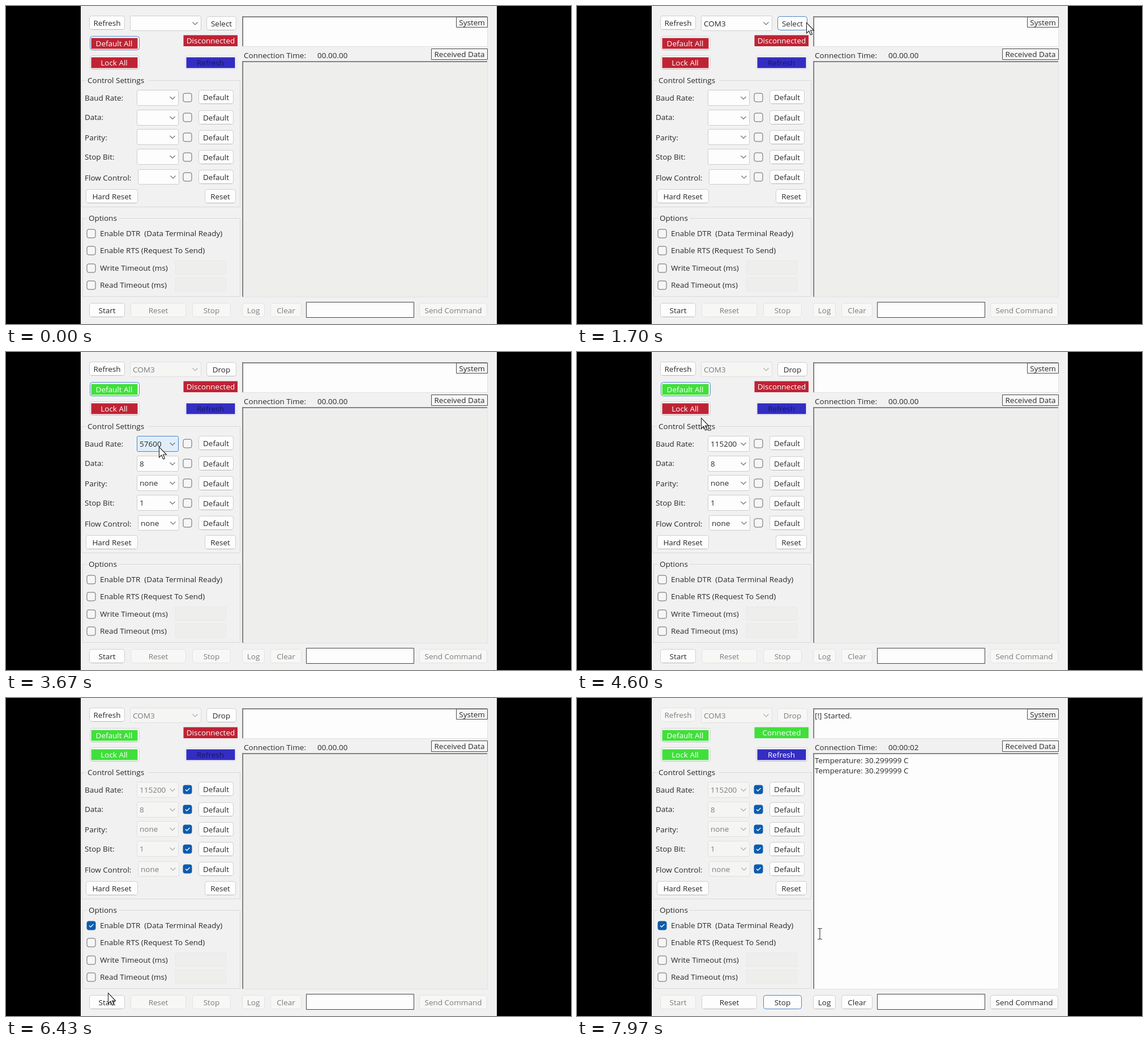
Write an HTML page with a canvas that moves like this. It is 998 px wide and 561 px high and loops after 8 s.

```html
<!DOCTYPE html>
<html lang="en">
<head>
<meta charset="utf-8">
<title>Serial monitor</title>
<style>
html, body { margin: 0; width: 100%; height: 100%; overflow: hidden; background: #000; }
canvas { display: block; }
</style>
</head>
<body>
<canvas id="stage" width="998" height="561"></canvas>
<script>
const ctx = document.getElementById('stage').getContext('2d');
const LOOP = 8000;
const FONT = '13.5px "Open Sans", "Noto Sans", sans-serif';
const INK = '#292929', GREY = '#7c7c7c', FACE = '#f1f1f1';
const RED = '#be2334', GREEN = '#40df3b', BLUE = '#332dc2', ACCENT = '#4a86c8';

// Moments when the interface changes
const AT = {
  port: 950, select: 1650, drop: 1790, defaults: 2560, lock: 4840,
  dtr: 5640, start: 6640, first: 7000, second: 7840
};
const BAUDS = ['9600', '14400', '19200', '38400', '57600', '115200'];
const BAUD_STEPS = [3290, 3380, 3470, 3580, 3900];

// Pointer path: time, x, y
const PATH = [
  [150, 470, 130], [620, 300, 32], [1080, 300, 32], [1600, 405, 29],
  [1850, 405, 29], [2400, 226, 56], [2680, 226, 56], [3220, 270, 167],
  [4020, 270, 167], [4600, 219, 116], [4760, 205, 102], [4960, 205, 102],
  [5520, 150, 401], [5770, 150, 401], [6430, 180, 520], [6540, 183, 533],
  [6860, 183, 533], [7600, 429, 416], [8000, 429, 416]
];

let now = 0, pointer = null, focus = '';

const ease = k => k * k * (3 - 2 * k);

function pointerAt(t) {
  if (t < PATH[0][0]) return null;
  const i = Math.max(1, PATH.findIndex(p => p[0] > t));
  const [t0, x0, y0] = PATH[i - 1], [t1, x1, y1] = PATH[i];
  const k = ease((t - t0) / (t1 - t0));
  return { x: x0 + (x1 - x0) * k, y: y0 + (y1 - y0) * k };
}

function focusAt(t) {
  if (t < AT.port) return 'defaultAll';
  if (t < AT.select) return '';
  if (t < AT.defaults) return 'select';
  if (t < AT.lock) return 'defaultAll';
  if (t < AT.dtr) return 'lockAll';
  return t < AT.start ? 'dtr' : 'stop';
}

const hovered = (x, y, w, h) => pointer &&
  pointer.x >= x && pointer.x <= x + w && pointer.y >= y && pointer.y <= y + h;

function rect(x, y, w, h, fill) {
  ctx.fillStyle = fill;
  ctx.fillRect(x, y, w, h);
}

function frame(x, y, w, h, stroke, fill, r = 0) {
  ctx.beginPath();
  ctx.roundRect(x + .5, y + .5, w - 1, h - 1, r);
  if (fill) { ctx.fillStyle = fill; ctx.fill(); }
  ctx.strokeStyle = stroke;
  ctx.lineWidth = 1;
  ctx.stroke();
}

function text(s, x, cy, color = INK, align = 'left') {
  ctx.fillStyle = color;
  ctx.textAlign = align;
  ctx.fillText(s, x, Math.round(cy + 5));
}

function buttonFace(x, y, w, h, on, id) {
  const lit = on && (hovered(x, y, w, h) || (id && id === focus));
  frame(x, y, w, h, lit ? ACCENT : on ? '#cfcfcf' : '#e3e3e3', on ? '#fdfdfd' : '#f7f7f6', 4);
  if (on && !lit) rect(x + 4, y + h - 1, w - 8, 1, '#b8b8b8');
}

function button(s, x, y, w, h, on = true, id = '') {
  buttonFace(x, y, w, h, on, id);
  text(s, x + w / 2, y + h / 2, on ? INK : GREY, 'center');
}

function colorButton(s, x, y, w, h, color, ink, on, id) {
  buttonFace(x, y, w, h, on, id);
  rect(x + 2.5, y + 3.5, w - 6, h - 6, color);
  text(s, x + w / 2 - 1, y + h / 2, ink, 'center');
}

function combo(s, x, y, w, h, on) {
  const lit = on && hovered(x, y, w, h);
  frame(x, y, w, h, lit ? ACCENT : on ? '#cdcdcd' : '#e0e0e0',
    lit ? '#e0eefa' : on ? '#fdfdfd' : '#f5f5f4', 2);
  text(s, x + 5, y + h / 2, on ? INK : GREY);
  const ax = x + w - 11, ay = y + h / 2;
  ctx.beginPath();
  ctx.moveTo(ax - 4.5, ay - 2);
  ctx.lineTo(ax, ay + 2.5);
  ctx.lineTo(ax + 4.5, ay - 2);
  ctx.strokeStyle = on ? '#6c6c6c' : '#aaa';
  ctx.lineWidth = 1.1;
  ctx.stroke();
}

function checkbox(x, cy, checked) {
  const y = cy - 7;
  frame(x - .5, y - .5, 16, 16, checked ? '#0c5cae' : '#666', checked ? '#0c5cae' : '#f6f6f6', 3);
  if (!checked) return;
  ctx.beginPath();
  ctx.moveTo(x + 4, y + 7.5);
  ctx.lineTo(x + 6.5, y + 10);
  ctx.lineTo(x + 11.5, y + 5);
  ctx.strokeStyle = '#fff';
  ctx.lineWidth = 1.3;
  ctx.stroke();
}

function group(title, x, y, w, h, gap) {
  frame(x, y, w, h, '#d9d9d9');
  rect(x + 8, y - 1, gap, 3, FACE);
  text(title, x + 11, y);
}

function sunken(x, y, w, h, fill) {
  rect(x, y, w, h, fill);
  rect(x, y, w, 1, '#9c9c9c');
  rect(x, y + 1, w, 1, '#6b6b6b');
  rect(x, y, 1, h, '#9c9c9c');
  rect(x + 1, y, 1, h, '#6b6b6b');
  rect(x + w - 1, y, 1, h, '#e2e2e2');
  rect(x, y + h - 1, w, 1, '#e2e2e2');
}

function tag(s, x, y, w, h) {
  frame(x, y, w, h, '#4c4c4c', '#f6f6f6');
  text(s, x + w / 2, y + h / 2, INK, 'center');
}

function drawTop(running) {
  const picked = now >= AT.drop;
  button('Refresh', 147, 17, 63, 25, !running);
  combo(now >= AT.port ? 'COM3' : '', 219, 17, 126, 27, !picked);
  button(picked ? 'Drop' : 'Select', 354, 18, 53, 25, !running, 'select');
  colorButton('Default All', 148, 53, 88, 25, now >= AT.defaults ? GREEN : RED, '#fff', true, 'defaultAll');
  colorButton('Lock All', 148, 87, 88, 25, now >= AT.lock ? GREEN : RED, '#fff', true, 'lockAll');
  rect(313.5, 51.5, 95.5, 19.5, running ? GREEN : RED);
  text(running ? 'Connected' : 'Disconnected', 361.5, 61, '#fff', 'center');
  colorButton('Refresh', 316, 87, 92, 25, BLUE, running ? '#fff' : '#191960', running);
}

function drawSettings() {
  const locked = now >= AT.lock, filled = now >= AT.defaults;
  const baud = BAUDS[BAUD_STEPS.filter(t => now >= t).length];
  const rows = [
    ['Baud Rate:', baud, 148, 148], ['Data:', '8', 183, 184], ['Parity:', 'none', 217, 219],
    ['Stop Bit:', '1', 252, 254], ['Flow Control:', 'none', 288, 289]
  ];
  group('Control Settings', 133, 131, 281, 224, 110);
  rows.forEach(([label, value, y, by], i) => {
    const last = i === 4 ? 1 : 0;
    text(label, 139, [162, 196, 232, 266, 303][i]);
    combo(filled ? value : '', 231 + 2 * last, y, 74 - last, 28 - last, !locked);
    checkbox(313, 161 + i * 35, locked);
    button('Default', 340, by, 62, 25);
  });
  button('Hard Reset', 141, 323, 92, 25);
  button('Reset', 351, 323, 55, 25);
}

function drawOptions() {
  group('Options', 135, 374, 279, 139, 56);
  ['Enable DTR  (Data Terminal Ready)', 'Enable RTS (Request To Send)',
    'Write Timeout (ms)', 'Read Timeout (ms)'].forEach((label, i) => {
    const cy = Math.round(401 + i * 30.4);
    checkbox(143, cy, i === 0 && now >= AT.dtr);
    text(label, 166, cy);
    if (i > 1) frame(299, cy - 13, 90, 25, '#e8e8e8', '#eeeeed');
  });
}

function drawOutput(running) {
  sunken(417, 18, 434, 54, '#fdfdfd');
  if (running) text('[!] Started.', 420, 31);
  tag('System', 795, 19, 56, 19);
  const seconds = now >= AT.second ? 2 : now >= AT.first ? 1 : 0;
  text('Connection Time:', 420, 87);
  text(running ? '00:00:0' + seconds : '00.00.00', 550, 87);
  sunken(417, 97, 434, 417, running ? '#fdfdfd' : '#eeeeed');
  tag('Received Data', 751, 75, 100, 20);
  for (let i = 0; i < seconds; i++) text('Temperature: 30.299999 C', 420, 110 + i * 18);
}

function drawBottom(running) {
  button('Start', 147, 524, 63, 25, !running);
  button('Reset', 220, 524, 98, 25, running);
  button('Stop', 329, 524, 68, 25, running, 'stop');
  button('Log', 417, 524, 40, 25, running);
  button('Clear', 467, 524, 55, 25, running);
  frame(530, 522, 191, 28, '#454545', '#fdfdfd');
  button('Send Command', 730, 524, 120, 25, running);
}

function drawPointer(running) {
  const { x, y } = pointer;
  ctx.save();
  ctx.translate(x, y);
  ctx.beginPath();
  if (running && x > 418 && y > 98) {
    ctx.moveTo(-4, -9.5); ctx.lineTo(-1, -9.5); ctx.lineTo(0, -8.5);
    ctx.lineTo(1, -9.5); ctx.lineTo(4, -9.5);
    ctx.moveTo(0, -8.5); ctx.lineTo(0, 8.5);
    ctx.moveTo(-4, 9.5); ctx.lineTo(-1, 9.5); ctx.lineTo(0, 8.5);
    ctx.lineTo(1, 9.5); ctx.lineTo(4, 9.5);
    ctx.strokeStyle = '#444';
    ctx.lineWidth = 1.2;
    ctx.stroke();
  } else {
    [[0, 0], [0, 18.5], [4.2, 14.5], [7.2, 21.5], [10, 20.3], [7, 13.5], [13, 13.5]]
      .forEach(([px, py]) => ctx.lineTo(px + .5, py + .5));
    ctx.closePath();
    ctx.fillStyle = '#fff';
    ctx.fill();
    ctx.strokeStyle = '#222';
    ctx.lineWidth = 1.1;
    ctx.stroke();
  }
  ctx.restore();
}

function draw(t) {
  now = t;
  pointer = pointerAt(t);
  focus = focusAt(t);
  const running = t >= AT.start;
  ctx.font = FONT;
  rect(0, 0, 998, 561, '#000');
  rect(132, 0, 735, 561, FACE);
  drawTop(running);
  drawSettings();
  drawOptions();
  drawOutput(running);
  drawBottom(running);
  if (pointer) drawPointer(running);
}

const begin = performance.now();
function tick() {
  draw((performance.now() - begin) % LOOP);
  requestAnimationFrame(tick);
}
tick();
</script>
</body>
</html>
```
